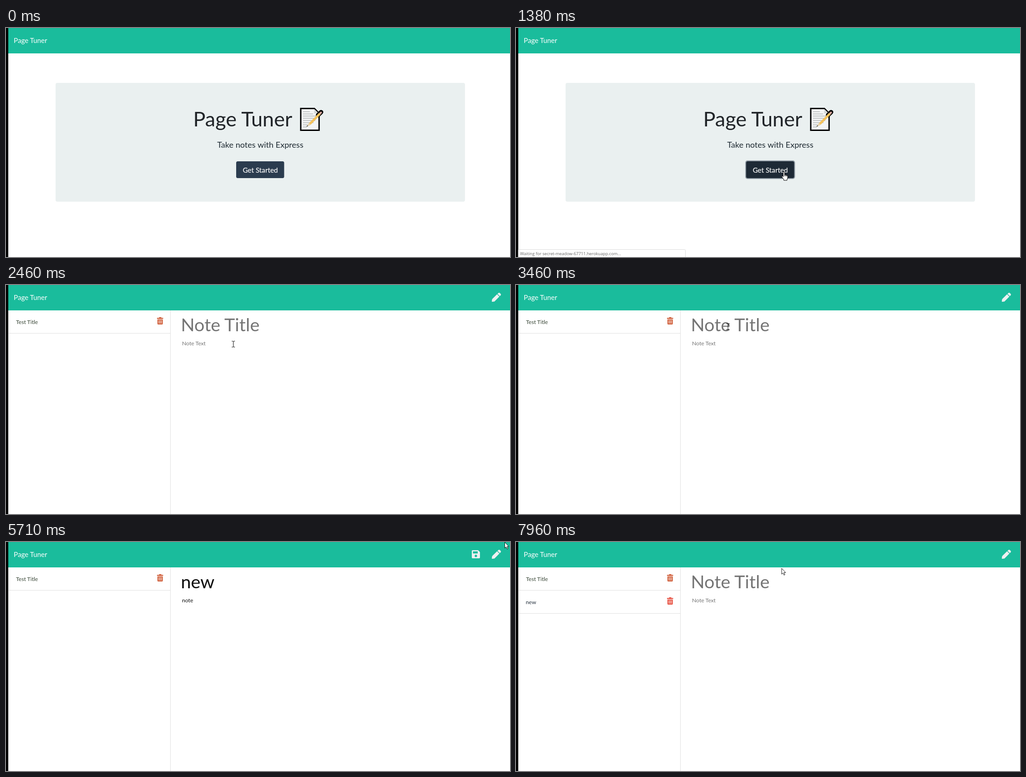
Write an HTML page that moves like this. It is 1108x505 px and loops after 8000 ms.

```html
<!DOCTYPE html>
<html lang="en">
<head>
<meta charset="utf-8">
<title>Page Tuner</title>
<style>
  html, body { margin: 0; width: 100%; height: 100%; overflow: hidden; background: #fff; }
  svg { display: block; width: 100%; height: 100%; font: 12.2px Lato, sans-serif; white-space: pre; }
  .mid { text-anchor: middle; }
</style>
</head>
<body>
<svg viewBox="0 0 1108 505">
  <defs>
    <g id="trash">
      <path d="M332 72.6h4l1-1.6h4l1 1.6h3.500v2.200h-13.500zM333 76h11.600v9.500q0 1.500-1.500 1.500h-8.600q-1.500 0-1.500-1.500z"/>
      <path d="M336 77.500v7.500M338.800 77.500v7.500M341.600 77.500v7.500" stroke="#fff" stroke-width="1.100"/>
    </g>
  </defs>
  <rect width="1108" height="505" fill="#fff"/>

  <g id="home">
    <rect x="109" y="121" width="900" height="262" rx="4" fill="#eaf0f0"/>
    <text x="411.500" y="217" font-size="45" fill="#212529">Page Tuner</text>
    <g id="memo">
      <path d="M648 177.600H678L688.300 188V225.400H648Z" fill="#f4f5f5" stroke="#000" stroke-width="3"/>
      <path d="M677.500 178.500v9.500h10z" fill="#d5d8d9"/>
      <path d="M653 184.500h15M653 189.500h22M653 194.300h29M653 199.100h29M653 203.900h27M653 208.700h23M653 213.500h15M653 218.300h8" stroke="#b4b7b8" stroke-width="1.500"/>
      <g fill="none" stroke-linecap="round">
        <path d="M686 192L692.800 185.500" stroke="#000" stroke-width="9.500"/>
        <path d="M668 211.500L690 189" stroke="#f4c25d" stroke-width="5.200" stroke-linecap="butt"/>
        <path d="M691 188l1.500-1.500" stroke="#d9a9a0" stroke-width="4.200"/>
      </g>
      <path d="M666 209.500l4 4-9.500 4.500z" fill="#e9d2a8"/>
      <path d="M662.500 214.500l1.800 1.800-4.300 2z" fill="#444"/>
    </g>
    <text class="mid" x="559" y="264" font-size="18.100" fill="#1f2b33">Take notes with Express</text>
    <rect id="ring" x="504" y="292" width="109.500" height="41" rx="5" fill="#909ba4"/>
    <rect id="button" x="506" y="294" width="105.500" height="37" rx="3.500"/>
    <text class="mid" x="559" y="318.500" font-size="15.300" fill="#fff" stroke="#fff" stroke-width=".2">Get Started</text>
  </g>

  <g id="notes">
    <path d="M361.500 56V505M6 106.500H361" stroke="#dfdfdf"/>
    <text x="22" y="86" fill="#384636">Test Title</text>
    <use href="#trash" fill="#cf5a35"/>
    <g id="row">
      <path d="M6 157.500H361" stroke="#dfdfdf"/>
      <text x="21.500" y="137" fill="#26323f">new</text>
      <use href="#trash" y="51" fill="#e74c3c"/>
    </g>
    <text id="title" x="384.500" y="101.500" font-size="39.600"></text>
    <text id="body" x="387" y="133"></text>
    <rect id="titleCaret" y="66" width="1" height="41"/>
    <rect id="bodyCaret" y="121" width="1" height="14"/>
  </g>

  <rect width="1108" height="56" fill="#1abc9c"/>
  <text x="17" y="33" font-size="15.200" fill="#fff">Page Tuner</text>
  <g id="tools" fill="#ecf0f1">
    <path d="M1080.500 19.500l2.200-2.100q1.400-1 2.700 0l2.300 2.300q1 1.400 0 2.700l-2.100 2.200zM1079.500 20.500l5.100 5.100-10.800 10.800-5 .6q-.9 0-.8-.9l.7-4.800z"/>
    <g id="save">
      <path d="M1026 18h11.800l4.200 4.200V34q0 2-2 2h-14q-2 0-2-2V20q0-2 2-2z"/>
      <path d="M1026.600 20.600h10.400v4.700h-10.400z" fill="#1abc9c"/>
      <circle cx="1033" cy="30.700" r="2.600" fill="#1abc9c"/>
    </g>
  </g>
  <rect width="5" height="505"/>

  <g id="status">
    <path d="M5 506V488.500H370.500Q372.500 488.500 372.500 490.500V506" fill="#fff" stroke="#dcdcdc"/>
    <text x="9" y="501" font-size="9.200" fill="#666" style="font-family:'Open Sans',sans-serif">Waiting for secret-meadow-67711.herokuapp.com...</text>
  </g>

  <g id="cursor" fill="#fff" stroke="#000" stroke-linejoin="round">
    <path id="arrow" d="M.5.5V13.500L3.400 10.800L5.600 15.600L7.700 14.600L5.600 10H9.300Z" stroke-width=".9"/>
    <path id="hand" d="M-1.500 11V1.300a1.500 1.500 0 0 1 3 0V7q1.700-1 2.500.4 1.600-.6 2.200.7 2-.2 2 1.500V13q0 2-1.400 4v2H-.3v-2L-4.500 11.300q-.7-2 1-2zM1.500 7v3M4 7.600v2.400M6.200 8.300v2"/>
    <path id="beam" d="M-3.500-6.500H-1L0-5.700 1-6.500H3.500M0-6V6M-3.500 6.500H-1L0 5.700 1 6.500H3.500" fill="none"/>
  </g>
</svg>
<script>
const LOOP = 8000;
const el = id => document.getElementById(id);
const show = (id, on) => el(id).style.display = on ? '' : 'none';
const within = (t, a, b) => t >= a && t < b;

// Pointer moves: start, end, number of steps, target x and y
const moves = [
  [140, 370, 4, 624, 357],
  [540, 930, 6, 589, 317],
  [1840, 2150, 5, 508, 140],
  [2460, 2770, 5, 467, 92],
  [2920, 2920, 1, 470, 92],
  [3000, 3000, 1, 466, 92],
  [5250, 5480, 4, 787, 2],
  [5710, 5710, 1, 1096, 0],
  [5790, 5860, 2, 1055, 9],
  [6030, 6330, 5, 1033, 12],
  [6640, 6730, 2, 1038, 18],
  [7040, 7040, 1, 1038, 22],
  [7340, 7960, 9, 583.5, 57.5]
];

// Share of a stepped change that is done; the first step falls on its start
function stepped(t, start, end, count) {
  if (t < start) return 0;
  const done = 1 + Math.floor((t - start) / (end - start || 1) * (count - 1) + 1e-6);
  return Math.min(count, done) / count;
}

function pointer(t) {
  let x = 876, y = 438;
  for (const [start, end, count, toX, toY] of moves) {
    const p = stepped(t, start, end, count);
    x += (toX - x) * p;
    y += (toY - y) * p;
  }
  return [x, y];
}

function typed(t, word, times) {
  return word.slice(0, times.filter(time => t >= time).length);
}

function field(id, text, hint, caretAt, caretOn) {
  const node = el(id), caret = el(id + 'Caret');
  node.textContent = text || hint;
  node.setAttribute('fill', text ? '#0c0c0c' : '#747474');
  const end = text ? +node.getAttribute('x') + node.getComputedTextLength() : caretAt;
  caret.setAttribute('x', Math.round(end));
  show(id + 'Caret', caretOn);
}

function drawPointer(t, saving) {
  const [x, y] = pointer(t);
  const onButton = t < 1840 && x < 612 && y < 331.5;
  const onSave = saving && within(x, 1024, 1043) && y > 10;
  const kind = onButton || onSave ? 'hand' : t >= 1840 && y > 60 ? 'beam' : 'arrow';
  for (const id of ['arrow', 'hand', 'beam']) show(id, id === kind);
  show('cursor', t >= 140 && !within(t, 3690, 5250));
  el('cursor').setAttribute('transform', `translate(${x} ${y})`);
  el('button').setAttribute('fill', onButton ? '#1e2a36' : '#2b3c4f');
}

function draw(t) {
  const onNotes = t >= 1530, saving = within(t, 4390, 7040), reset = t >= 7040;
  show('home', !onNotes);
  show('notes', onNotes);
  show('tools', onNotes);
  show('ring', t >= 1070);
  show('save', saving);
  show('row', t >= 7340);
  el('status').style.opacity = stepped(t, 1070, 1380, 5) - stepped(t, 1840, 2150, 5);

  if (onNotes) {
    field('title', reset ? '' : typed(t, 'new', [3690, 3840, 3920]), 'Note Title', 386,
      within(t, 2920, 3460) || within(t, 3690, 4150));
    field('body', reset ? '' : typed(t, 'note', [4320, 4540, 4620, 4700]), 'Note Text', 388,
      within(t, 4150, 5250) || within(t, 5790, 6250));
  }
  drawPointer(t, saving);
}

const begin = performance.now();
function tick() {
  draw((performance.now() - begin) % LOOP);
  requestAnimationFrame(tick);
}
tick();
</script>
</body>
</html>
```
